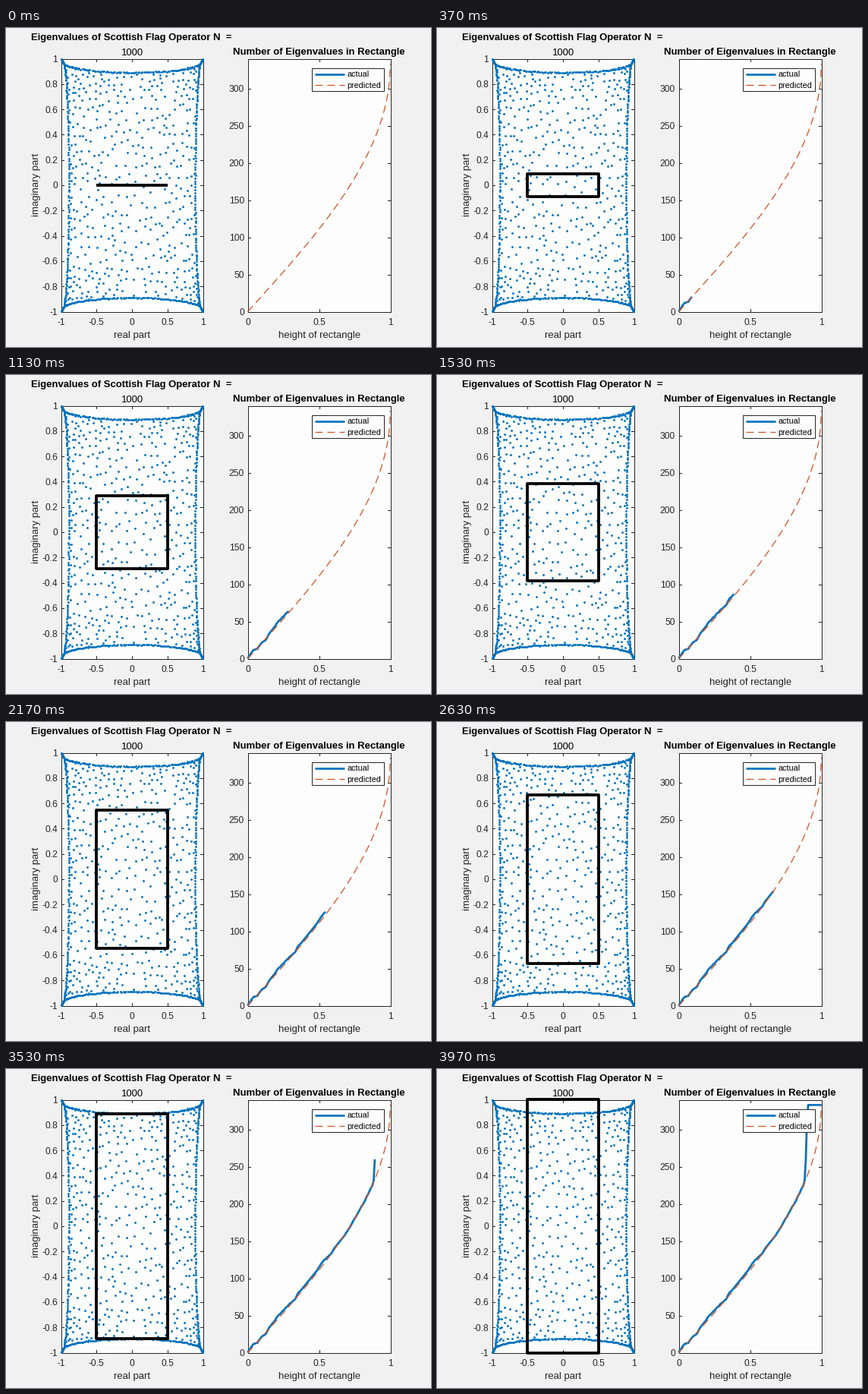
Write a matplotlib script that moves like this. It is 560 by 420 pixels and loops after 4010 ms.

```python
import numpy as np
import matplotlib.pyplot as plt
from matplotlib.animation import FuncAnimation
from matplotlib.patches import Polygon, Rectangle

W, H, DPI = 560, 420, 100
PT = 72 / DPI
TICKS, LOOP_MS = 401, 4010
STEPS = 119
N = 1000

INK = "#262626"
PAPER = "#fdfdfd"
BLUE = "#0072bd"
ORANGE = "#d1562a"

plt.rcParams["font.family"] = "Liberation Sans"
fig = plt.figure(figsize=(W / DPI, H / DPI), dpi=DPI, facecolor="#f1f1f1")
ax = fig.add_axes([0, 0, 1, 1])
ax.set(xlim=(0, W), ylim=(H, 0))
ax.axis("off")


class Panel:
    """Maps data ranges to a pixel box on the stage."""

    def __init__(self, left, right, xlim, ylim, top=40.5, bottom=373.5):
        self.box = left, right, top, bottom
        self.xlim, self.ylim = xlim, ylim

    def x(self, v):
        left, right, _, _ = self.box
        return np.interp(v, self.xlim, (left, right))

    def y(self, v):
        _, _, top, bottom = self.box
        return np.interp(v, self.ylim, (bottom, top))

    def draw_frame(self, xticks, yticks, size=3.3):
        left, right, top, bottom = self.box
        ax.add_patch(Rectangle((left, top), right - left, bottom - top,
                               fc=PAPER, ec="none", zorder=0))
        xs = [left, right, right, left, left, np.nan]
        ys = [top, top, bottom, bottom, top, np.nan]
        for v in xticks:
            px = self.x(v)
            xs += [px, px, np.nan] * 2
            ys += [bottom, bottom - size, np.nan, top, top + size, np.nan]
            text(px, 390.6, f"{v:g}", 12, INK)
        for v in yticks:
            py = self.y(v)
            xs += [left, left + size, np.nan, right, right - size, np.nan]
            ys += [py, py, np.nan] * 2
            text(left - 4.5, py + 4.4, f"{v:g}", 12, INK, ha="right")
        ax.plot(xs, ys, color=INK, lw=PT, zorder=1)


def text(x, y, s, px=13.15, color="black", ha="center", va="baseline", **kw):
    return ax.text(x, y, s, fontsize=px * PT, color=color, ha=ha, va=va, **kw)


def edge(s):
    """Distance of the spectrum's curved rim from the centre line."""
    return 0.89 + 0.045 * s**2 + 0.03 * s**6


def spectrum(rng, inner=470, rim=112, tail=15):
    # Interior: evenly spread in the angles, so dense towards the rim.
    angles = np.empty((0, 2))
    while len(angles) < inner:
        cand = rng.uniform(-1.25, 1.25, (8, 2))
        x, y = np.abs(np.sin(cand)).T
        cand = cand[(x < edge(y) - 0.015) & (y < edge(x) - 0.015)]
        if not len(cand):
            continue
        if len(angles):
            gap = np.hypot(*(cand[:, None] - angles).T).min(axis=0)
            cand = cand[[gap.argmax()]]
        angles = np.vstack([angles, cand[:1]])
    parts = [np.sin(angles)]

    # Four rims, then diagonal tails running out to the corners.
    join = 0.954
    for sign in (-1, 1):
        for flip in (1, -1):
            s = np.sin(np.linspace(-1, 1, rim) * np.arcsin(join))
            s = np.clip(s + rng.normal(0, 0.004, rim), -join, join)
            r = sign * (edge(s) + rng.normal(0, 0.0025, rim))
            parts.append(np.column_stack([s, r])[:, ::flip])
            d = np.linspace(join, 0.998, tail)
            parts.append(np.column_stack([sign * d, sign * flip * d]))
    return np.vstack(parts)


left = Panel(72.5, 259.5, (-1, 1), (-1, 1))
right = Panel(318.5, 506.5, (0, 1), (0, 340))
left.draw_frame(np.linspace(-1, 1, 5), np.round(np.linspace(-1, 1, 11), 1))
right.draw_frame((0, 0.5, 1), range(0, 301, 50))

text(165.3, 16, "Eigenvalues of Scottish Flag Operator N  =", weight="bold")
text(166.2, 36, str(N))
text(412.7, 35.5, "Number of Eigenvalues in Rectangle", weight="bold")
text(166.2, 408, "real part", color=INK)
text(412.7, 408, "height of rectangle", color=INK)
text(40.3, 206.7, "imaginary part", color=INK, va="center", rotation=90)

pts = spectrum(np.random.default_rng(7))
ax.plot(left.x(pts[:, 0]), left.y(pts[:, 1]), ls="", marker="o",
        ms=2.9 * PT, mew=0, color=BLUE, zorder=2)

# Counted and predicted numbers against the rectangle's height.
height = np.linspace(0, 1, STEPS + 1)
knots = np.array([
    (0, 0), (0.04, 12), (0.067, 13), (0.09, 20), (0.125, 25), (0.15, 34),
    (0.185, 42), (0.21, 49), (0.25, 57), (0.28, 63), (0.3, 67), (0.33, 71),
    (0.35, 79), (0.386, 87), (0.43, 97), (0.48, 109), (0.5, 115),
    (0.515, 120), (0.55, 127), (0.58, 132), (0.61, 141), (0.65, 151),
    (0.68, 158), (0.71, 167), (0.773, 188), (0.82, 204), (0.85, 216),
    (0.875, 225), (0.883, 232), (0.89, 255), (0.9, 320), (0.907, 333),
    (1, 333)])
counted = np.round(np.interp(height, *knots.T))
predicted = N / 3 * 2 / np.pi * np.arcsin(height)

curve_x, curve_y = right.x(height), right.y(counted)
actual_style = dict(color=BLUE, lw=2.7 * PT, solid_capstyle="butt")
predicted_style = dict(color=ORANGE, lw=1.3 * PT, dashes=(7.7, 4.6),
                       dash_capstyle="butt")
curve, = ax.plot([], [], zorder=3, solid_joinstyle="round", **actual_style)
ax.plot(curve_x, right.y(predicted), zorder=4, **predicted_style)

ax.add_patch(Rectangle((402.5, 52.5), 95, 30, fc=PAPER, ec=INK, lw=PT,
                       zorder=5))
for y, name, style in ((60.5, "actual", actual_style),
                       (75.0, "predicted", predicted_style)):
    ax.plot([406.5, 446], [y, y], zorder=6, **style)
    text(449.5, y + 3.6, name, 10.7, ha="left", zorder=6)

window = Polygon(np.zeros((4, 2)), fill=False, ec="black", lw=3.8 * PT,
                 joinstyle="round", zorder=5)
ax.add_patch(window)


def update(tick):
    # The picture advances thirty times a second on a 10 ms clock.
    k = min((3 * tick + 1) // 10, STEPS)
    x0, x1 = left.x((-0.5, 0.5))
    # A sliver of height keeps the flat box drawable.
    y0, y1 = left.y(-height[k]) + 0.01, left.y(height[k]) - 0.01
    window.set_xy([(x0, y0), (x1, y0), (x1, y1), (x0, y1)])
    curve.set_data(curve_x[:k + 1], curve_y[:k + 1])
    return window, curve


anim = FuncAnimation(fig, update, frames=TICKS, interval=LOOP_MS // TICKS,
                     repeat=True, repeat_delay=0, cache_frame_data=False)
plt.show()
```
